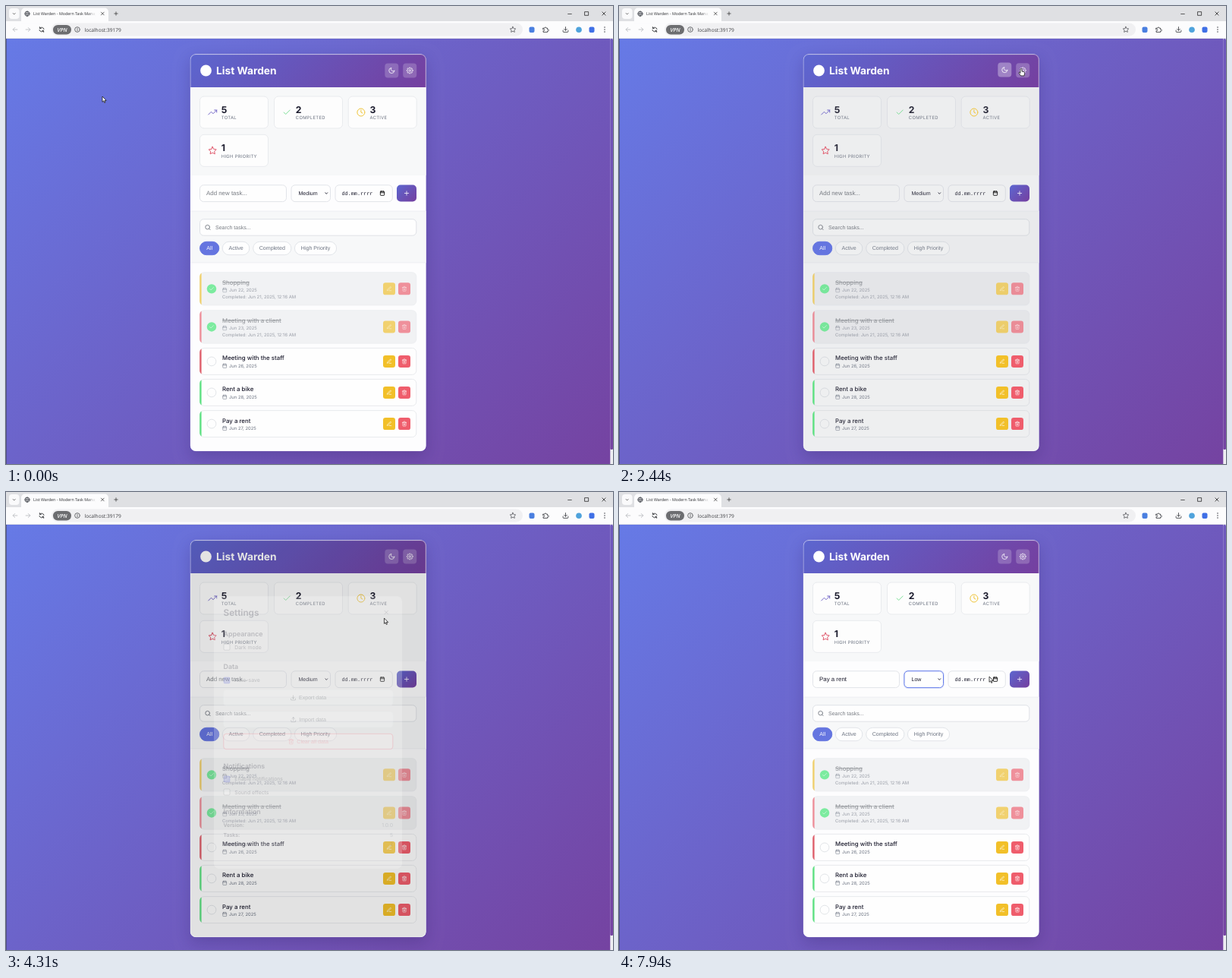
Animation, 800 px wide and 603 px high, one loop 8000 ms. Source, as an HTML page with a canvas:

```html
<!DOCTYPE html>
<html lang="en">
<head>
<meta charset="utf-8">
<title>List Warden - Modern Task Manager</title>
<style>
html, body { margin: 0; width: 100%; height: 100%; overflow: hidden; background: #6a5fc4; }
canvas { display: block; width: 800px; height: 603px; }
</style>
</head>
<body>
<canvas id="stage" width="800" height="603"></canvas>
<script>
const LOOP = 8000, W = 800, H = 603;
const screen2d = document.getElementById('stage').getContext('2d');
const layer = document.createElement('canvas');
layer.width = W; layer.height = H;
const layer2d = layer.getContext('2d');
let g = screen2d, now = 0, dark = 0;

const circle = (x, y, r) => `M${x + r} ${y}a${r} ${r} 0 1 1 ${-2 * r} 0a${r} ${r} 0 1 1 ${2 * r} 0`;
const rays = [...Array(8)].map((_, i) => {
  const c = Math.cos(i * Math.PI / 4), s = Math.sin(i * Math.PI / 4);
  return `M${12 + 8 * c} ${12 + 8 * s}L${12 + 11 * c} ${12 + 11 * s}`;
}).join('');
const cog = [...Array(64)].map((_, i) => {
  const a = i * Math.PI / 32, r = 8.9 + 1.5 * Math.tanh(2.5 * Math.cos(8 * a));
  return `${i ? 'L' : 'M'}${12 + r * Math.cos(a)} ${12 + r * Math.sin(a)}`;
}).join('') + 'z';
const tray = 'M21 15v4a2 2 0 0 1-2 2H5a2 2 0 0 1-2-2v-4';

// all icons sit in a 24 x 24 box
const ICONS = {
  moon: 'M21 12.8A9 9 0 1 1 11.2 3 7 7 0 0 0 21 12.8z',
  sun: circle(12, 12, 4.5) + rays,
  gear: cog + circle(12, 12, 3.2),
  trend: 'M23 6l-9.5 9.5-5-5L1 18M17 6h6v6',
  check: 'M20 6L9 17l-5-5',
  clock: circle(12, 12, 10) + 'M12 6v6l4 2',
  star: 'M12 2l3.1 6.3 6.9 1-5 4.8 1.2 6.9-6.2-3.2L5.8 21 7 14.1 2 9.3l6.9-1z',
  plus: 'M12 5v14M5 12h14',
  search: circle(11, 11, 8) + 'M21 21l-4.4-4.4',
  calendar: 'M5 4h14a2 2 0 0 1 2 2v14a2 2 0 0 1-2 2H5a2 2 0 0 1-2-2V6a2 2 0 0 1 2-2zM16 2v4M8 2v4M3 10h18',
  edit: 'M12 20h9M16.5 3.5a2.1 2.1 0 0 1 3 3L7 19l-4 1 1-4z',
  trash: 'M3 6h18M19 6v14a2 2 0 0 1-2 2H7a2 2 0 0 1-2-2V6M8 6V4a2 2 0 0 1 2-2h4a2 2 0 0 1 2 2v2M10 11v6M14 11v6',
  download: tray + 'M7 10l5 5 5-5M12 15V3',
  upload: tray + 'M17 8l-5-5-5 5M12 3v12',
  cross: 'M18 6L6 18M6 6l12 12',
  down: 'M5 8l7 8 7-8',
  left: 'M20 12H4M11 5l-7 7 7 7',
  right: 'M4 12h16M13 5l7 7-7 7',
  reload: 'M20 11A8.3 8.3 0 0 0 5 8M4 13a8.3 8.3 0 0 0 15 3M5 3v5h5M19 21v-5h-5',
  info: circle(12, 12, 10) + 'M12 11v6M12 7v1',
  globe: circle(12, 12, 10) + 'M2 12h20M12 2q-9 10 0 20M12 2q9 10 0 20',
  puzzle: 'M4 7h5a3 3 0 1 1 6 0h4v5a3 3 0 1 1 0 5v4H4v-5a3 3 0 1 0 0-5z',
  square: 'M4 4h16v16H4z',
  minus: 'M4 12h16'
};
for (const k in ICONS) ICONS[k] = new Path2D(ICONS[k]);

const POINTERS = {
  arrow: new Path2D('M0 0V7.3L1.7 5.8 2.8 8.4 4 7.9 2.9 5.4H5.2z'),
  hand: new Path2D('M-1 1a1 1 0 0 1 2 0V3.6L3.6 4.2Q4.8 4.6 4.6 6L4 9.4H-.4L-2.9 6Q-3.2 4.8-2 5L-1 6z')
};

const clamp = v => Math.min(1, Math.max(0, v));
const ease = p => p * p * (3 - 2 * p);
const ramp = (a, b) => ease(clamp((now - a) / (b - a)));
const between = (a, b) => now >= a && now < b;
const rgb = h => [1, 3, 5].map(i => parseInt(h.slice(i, i + 2), 16));
function mix(a, b, p) {
  const to = rgb(b);
  return `rgb(${rgb(a).map((v, i) => Math.round(v + (to[i] - v) * p))})`;
}
const tone = (light, night) => mix(light, night, dark);

const inter = (size, weight = 400) => `${weight} ${size}px Inter, sans-serif`;
const arial = size => `${size}px "Liberation Sans", Arial, sans-serif`;
const ui = size => `${size}px "Open Sans", sans-serif`;

function text(s, x, y, font, color, align = 'left') {
  g.font = font;
  g.fillStyle = color;
  g.textAlign = align;
  g.fillText(s, x, y);
}
function box(x, y, w, h, r, fill, line, lw = 0.9) {
  g.beginPath();
  g.roundRect(x, y, w, h, r);
  if (fill) { g.fillStyle = fill; g.fill(); }
  if (line) { g.strokeStyle = line; g.lineWidth = lw; g.stroke(); }
}
function rect(x, y, w, h, fill) {
  g.fillStyle = fill;
  g.fillRect(x, y, w, h);
}
function disc(x, y, r, fill, line) { box(x - r, y - r, 2 * r, 2 * r, r, fill, line); }
function icon(name, x, y, size, color, lw = 2) {
  g.save();
  g.translate(x - size / 2, y - size / 2);
  g.scale(size / 24, size / 24);
  g.lineWidth = lw;
  g.lineCap = g.lineJoin = 'round';
  g.strokeStyle = color;
  g.stroke(ICONS[name]);
  g.restore();
}
function diagonal(x, y, w, h, from, to) {
  const d = (w + h) / 4, cx = x + w / 2, cy = y + h / 2;
  const grad = g.createLinearGradient(cx - d, cy - d, cx + d, cy + d);
  grad.addColorStop(0, from);
  grad.addColorStop(1, to);
  return grad;
}
const brand = (x, y, w, h) => diagonal(x, y, w, h, tone('#5c66cf', '#6a78e6'), tone('#753f9f', '#7645a6'));

function drawBrowser() {
  rect(0, 0, W, 20, '#dfe0e3');
  rect(0, 20, W, 23, '#fcfcfd');
  rect(0, 42.4, W, 0.6, '#d5d6da');
  box(4, 3, 13.5, 14, 4, '#fafafb');
  icon('down', 10.7, 10.3, 5, '#333333', 3);
  box(20, 2.5, 115, 20, [5, 5, 0, 0], '#fcfcfd');
  icon('globe', 28, 10.2, 7.5, '#50545a', 3);
  g.save();
  g.beginPath(); g.rect(36, 2, 82, 16); g.clip();
  text('List Warden - Modern Task Manager', 36, 12.2, ui(5.35), '#2b2c2f');
  const fade = g.createLinearGradient(108, 0, 118, 0);
  fade.addColorStop(0, 'rgba(252,252,253,0)');
  fade.addColorStop(1, '#fcfcfd');
  rect(108, 4, 10, 12, fade);
  g.restore();
  icon('cross', 127.3, 10, 7.5, '#333333', 2.4);
  icon('plus', 145, 10, 7.5, '#333333', 2.4);
  icon('minus', 743, 10.5, 7, '#222222', 2.4);
  icon('square', 765.3, 10, 7, '#222222', 2.6);
  icon('cross', 788, 10, 8.5, '#222222', 2.2);

  icon('left', 12, 31, 8.5, '#b9bbc0', 2.4);
  icon('right', 29, 31, 8.5, '#b9bbc0', 2.4);
  icon('reload', 47, 31, 9, '#45474b', 2.6);
  box(60, 22.5, 621, 17, 8.5, '#f0f0f2');
  box(62, 25, 24, 12.5, 6.2, '#6c6d70');
  text('VPN', 74, 33.7, 'italic 600 7px "Open Sans", sans-serif', '#ffffff', 'center');
  icon('info', 94, 31, 8, '#45474b', 2.3);
  text('localhost:39179', 103.5, 33.5, ui(6.6), '#3c3d41');
  icon('star', 668, 31, 9, '#5a5c60', 2.2);
  box(689.5, 27.5, 7, 7.5, 2, '#4a7fe0');
  icon('puzzle', 711, 31, 9, '#45474b', 2.4);
  icon('download', 737.5, 31, 9, '#45474b', 2.4);
  disc(755, 31.3, 3.8, '#4fa3dc');
  box(768.5, 27.5, 7, 7.5, 2, '#3f6fe6');
  for (const y of [28, 31, 34]) disc(789, y, 0.8, '#45474b');
}

function drawPage() {
  rect(0, 43, W, H - 43, diagonal(0, 43, 797, 580, '#667ae6', '#7542a0'));
  rect(0, 43, 0.7, H - 43, '#44466e');
  rect(796.3, 43, 3.7, H - 43, '#eeeef2');
  box(796.3, 43, 3.7, 541, 1.5, diagonal(0, 43, 797, 580, '#667ae6', '#7542a0'));
  g.save();
  g.shadowColor = 'rgba(30,20,80,0.22)';
  g.shadowBlur = 20;
  g.shadowOffsetY = 7;
  box(243, 63.5, 310.5, 522.5, 7, '#6a5fc4');
  g.restore();
}

function headButton(name, x, y, hover) {
  box(x - 9, y - 9.5 - hover, 18, 19, 4, `rgba(255,255,255,${0.2 + 0.14 * hover})`);
  icon(name, x, y - hover * 0.9, 9.5, '#ffffff');
}

function drawStat(x, y, name, color, value, label, line) {
  box(x, y, 90, 42, 5.5, tone('#fdfdfd', '#101724'), line);
  icon(name, x + 16.7, y + 21, 12, color);
  text(value, x + 28.3, y + 21.7, inter(12.2, 700), tone('#1b1b2d', '#f9fafb'));
  g.letterSpacing = '0.3px';
  text(label, x + 28.3, y + 30.4, inter(5.89), tone('#6b7280', '#dfe2e8'));
  g.letterSpacing = '0px';
}

function drawField(x, w, line, focus) {
  if (focus) box(x, 235.8, w, 21.8, 5, null, `rgba(102,126,234,${0.18 * focus})`, 3);
  box(x, 235.8, w, 21.8, 5, tone('#fefefe', '#101724'), focus ? mix('#e2e4e9', '#667eea', focus) : line, 1);
}

function drawForm(line, ink) {
  const typed = 'Pay a rent'.slice(0, Math.floor(clamp((now - 5600) / 1100) * 10.01));
  const inputFocus = ramp(5350, 5620) * (1 - ramp(6950, 7100));
  drawField(255.5, 114, line, inputFocus);
  text(typed || 'Add new task...', 264, 249.4, arial(7.9), typed ? ink : tone('#777b82', '#737984'));
  if (between(5350, 6950) && (between(5600, 6700) || (now - 5350) % 1060 < 530)) {
    g.font = arial(7.9);
    rect(264 + g.measureText(typed).width, 242, 0.7, 9, ink);
  }
  drawField(376, 51.5, line, ramp(6950, 7150));
  text(now < 7270 ? 'Medium' : 'Low', 385.5, 249.3, arial(7.06), ink);
  icon('down', 422.3, 246.6, 5, ink, 4);
  drawField(434, 75.3, line, 0);
  text('dd.mm.rrrr', 442.5, 249, '6.8px "Liberation Mono", monospace', ink);
  icon('calendar', 496, 246.4, 7, tone('#111111', '#05080f'), 3);
  box(515, 235.5, 26, 22, 5, brand(515, 235.5, 26, 22));
  icon('plus', 528, 246.5, 9, '#ffffff');
}

function drawFilters(line, ink) {
  box(255.5, 280.7, 285.3, 21.5, 5, tone('#fefefe', '#101724'), tone('#dfe2e7', '#4a5261'), 1);
  icon('search', 266, 291.5, 8.5, tone('#565b66', '#d9dde3'));
  text('Search tasks...', 276, 293.9, arial(7.06), tone('#777b82', '#737984'));
  const pills = [['All', 255.5, 25.3], ['Active', 285.3, 35.5], ['Completed', 325.7, 50.2], ['High Priority', 380.4, 55.2]];
  pills.forEach(([label, x, w], i) => {
    box(x, 310.3, w, 17.4, 8.7, i ? tone('#fefefe', '#101724') : '#6575e0', i ? tone('#dfe2e7', '#4a5261') : '#6575e0');
    text(label, x + w / 2, 321.4, arial(7.06), i ? tone('#6b7280', '#eceef2') : '#ffffff', 'center');
  });
}

function drawTask([title, day, y, h, edge, done], line, ink) {
  const mid = y + h / 2, soft = tone('#6b7280', '#d1d5db');
  g.save();
  g.globalAlpha = done ? 0.65 : 1;
  box(255.5, y, 285.3, h, 5.5, done ? tone('#ecedf0', '#373c4e') : tone('#fefefe', '#101724'), line);
  g.save();
  box(255.2, y, 285.5, h, 5.5);
  g.clip();
  rect(255, y, 2.6, h, edge);
  g.restore();
  if (done) {
    disc(271, mid, 6.2, tone('#3ee872', '#4ade6c'));
    icon('check', 271, mid, 7.5, '#ffffff', 2.4);
  } else {
    disc(271, mid, 5.9, tone('#fefefe', '#101724'), tone('#dfe2e6', '#4a5261'));
  }
  const head = done ? tone('#6f7379', '#a4a8b0') : ink;
  text(title, 285, y + 16, inter(7.85, 500), head);
  if (done) rect(285, y + 12.8, g.measureText(title).width, 0.7, head);
  icon('calendar', 288.2, y + 23.3, 6.5, soft);
  text(`Jun ${day}, 2025`, 294, y + 25.6, inter(5.89), soft);
  if (done) text('Completed: Jun 21, 2025, 12:16 AM', 285, y + 34.4, inter(5.89), soft);
  box(497, mid - 8, 16, 16, 3.2, '#f2c029');
  icon('edit', 505, mid, 7.2, '#ffffff');
  box(517, mid - 8, 16, 16, 3.2, '#ef5d6c');
  icon('trash', 525, mid, 7.2, '#ffffff');
  g.restore();
}

const YELLOW = '#f2c029', RED = '#ef5d6c', GREEN = '#5fe283';
const TASKS = [
  ['Shopping', 22, 350.7, 43.3, YELLOW, true],
  ['Meeting with a client', 23, 400.7, 43.5, RED, true],
  ['Meeting with the staff', 26, 450.4, 35, '#e0606c', false],
  ['Rent a bike', 28, 491.4, 35, GREEN, false],
  ['Pay a rent', 27, 532.6, 35, GREEN, false]
];

function drawCard() {
  const line = tone('#e7e9ed', '#3b4454'), ink = tone('#1b1b2d', '#f9fafb');
  const panel = tone('#f7f8f9', '#202834');
  g.save();
  box(243, 63.5, 310.5, 522.5, 7, tone('#fdfdfe', '#101724'));
  g.clip();
  rect(243, 63.5, 311, 43.5, brand(243, 63.5, 310.5, 43.5));
  disc(263.5, 85, 7.4, '#ffffff');
  text('List Warden', 277, 90, inter(13.74, 700), '#ffffff');
  const moonHover = ramp(1450, 1700) * (1 - ramp(2400, 2650));
  headButton(between(1800, 2230) ? 'sun' : 'moon', 508.3, 85, moonHover);
  headButton('gear', 532.2, 85, ramp(2380, 2600) * (1 - ramp(2900, 3100)));

  rect(243, 107, 311, 115.5, panel);
  drawStat(255.5, 119, 'trend', tone('#7468c8', '#7684ea'), '5', 'TOTAL', line);
  drawStat(353.5, 119, 'check', tone('#7fdf98', '#6ee48a'), '2', 'COMPLETED', line);
  drawStat(451.2, 119, 'clock', '#f0c437', '3', 'ACTIVE', line);
  drawStat(255.5, 169.3, 'star', tone('#e0566a', '#f0717e'), '1', 'HIGH PRIORITY', line);
  rect(243, 222, 311, 0.6, tone('#f4f5f7', '#3b4454'));
  drawForm(tone('#e2e4e9', '#4a5261'), ink);
  rect(243, 270, 311, 68, panel);
  rect(243, 269.7, 311, 0.7, line);
  rect(243, 337.6, 311, 0.7, line);
  drawFilters(line, ink);
  for (const task of TASKS) drawTask(task, line, ink);
  g.restore();
}

function checkbox(label, y, on) {
  box(287, y - 4, 8, 8, 1.4, on ? '#6470dc' : '#ffffff', on ? '#6470dc' : '#74777d', 0.8);
  if (on) icon('check', 291, y, 7, '#ffffff', 3.2);
  text(label, 301.3, y + 2.5, inter(6.87), '#2b2d3a');
}

function wideButton(label, name, y, tint) {
  box(286.8, y, 223, 20.3, 3.5, tint ? '#fdeef0' : '#f8f9fa', tint || '#e7e9ed', tint ? 1 : 0.8);
  g.font = arial(7.06);
  const left = 398.3 - (g.measureText(label).width + 11.5) / 2;
  icon(name, left + 4, y + 10.2, 8, tint || '#22232f');
  text(label, left + 11.5, y + 12.6, arial(7.06), tint || '#22232f');
}

function drawModal(p) {
  g.save();
  g.globalAlpha = p;
  g.translate(0, -10 * (1 - p));
  box(274, 145, 248, 358.6, 6.5, '#fefefe');
  const ink = '#1b1b2d';
  text('Settings', 286.5, 171.2, inter(11.78, 600), ink);
  icon('cross', 501.2, 166.4, 9, '#565b66');
  rect(274, 177, 248, 0.7, '#e7e9ed');
  const heads = [['Appearance', 197.7], ['Data', 241.2], ['Notifications', 371.4], ['Information', 431.6]];
  for (const [label, y] of heads) text(label, 286.5, y, inter(8.83, 600), ink);
  checkbox('Dark mode', 212, false);
  checkbox('Auto-save', 255.8, true);
  wideButton('Export data', 'download', 268.6);
  wideButton('Import data', 'upload', 297.3);
  wideButton('Clear all data', 'trash', 326.2, '#ee6373');
  checkbox('Enable notifications', 385.8, true);
  checkbox('Sound effects', 402.9, false);
  [['Version:', '1.0.0'], ['Tasks:', '5'], ['Completed:', '2']].forEach(([label, value], i) => {
    const y = 448.8 + i * 12.6;
    text(label, 286.5, y, inter(6.87, 600), ink);
    text(value, 510, y, inter(6.87), '#6b7280', 'right');
  });
  g.restore();
}

// time, x, y
const PATH = [
  [0, 127, 119], [150, 127, 119], [1500, 512.5, 85], [2250, 512.5, 83.5], [2420, 530, 82.5],
  [2950, 531, 83], [3690, 506, 149], [3950, 501, 165], [4250, 501, 165], [5200, 285, 254],
  [6720, 285, 254], [6920, 402, 248], [7080, 402, 248], [7260, 375, 268], [7690, 375, 268],
  [7940, 488, 243], [8000, 488, 243]
];

function drawPointer(modal) {
  let i = 1;
  while (i < PATH.length - 1 && now > PATH[i][0]) i++;
  const [ta, xa, ya] = PATH[i - 1], [tb, xb, yb] = PATH[i];
  const p = ramp(ta, tb), x = xa + (xb - xa) * p, y = ya + (yb - ya) * p;
  const over = (l, t, r, b) => x > l && x < r && y > t && y < b;
  g.save();
  g.translate(x, y);
  if (!modal && over(255, 235, 370, 258)) {
    g.strokeStyle = '#222222';
    g.lineWidth = 0.8;
    g.stroke(new Path2D('M-2-4H-.6Q0-4 0-3.4Q0-4 .6-4H2M0-3.4V3.4M-2 4H-.6Q0 4 0 3.4Q0 4 .6 4H2'));
  } else {
    const onButton = modal ? over(493, 158, 510, 175)
      : over(499, 75, 518, 95) || over(523, 75, 542, 95);
    const shape = POINTERS[onButton ? 'hand' : 'arrow'];
    g.fillStyle = '#ffffff';
    g.strokeStyle = '#1a1a1a';
    g.lineWidth = 0.8;
    g.lineJoin = 'round';
    g.fill(shape);
    g.stroke(shape);
  }
  g.restore();
}

function draw(t) {
  now = t;
  dark = ramp(1800, 2080) - ramp(2230, 2480);
  const open = ramp(2750, 3050) * (1 - ramp(4150, 4380));
  g = screen2d;
  g.textRendering = 'geometricPrecision';
  drawBrowser();
  g.save();
  g.beginPath(); g.rect(0, 43, W, H - 43); g.clip();
  drawPage();
  drawCard();
  if (open > 0) {
    g = layer2d;
    g.textRendering = 'geometricPrecision';
    g.clearRect(0, 0, W, H);
    drawCard();
    g = screen2d;
    g.save();
    box(243, 63.5, 310.5, 522.5, 7);
    g.clip();
    g.filter = `blur(${2 * open}px)`;
    g.drawImage(layer, 0, 0);
    g.filter = 'none';
    rect(243, 63, 311, 524, `rgba(0,0,0,${0.5 * open})`);
    g.restore();
  }
  box(243.2, 63.7, 310, 522, 7, null, 'rgba(255,255,255,0.5)', 0.8);
  if (open > 0) drawModal(open);
  g.restore();
  drawPointer(open > 0.5);
}

const start = performance.now();
function tick() {
  draw((performance.now() - start) % LOOP);
  requestAnimationFrame(tick);
}
tick();
</script>
</body>
</html>
```
